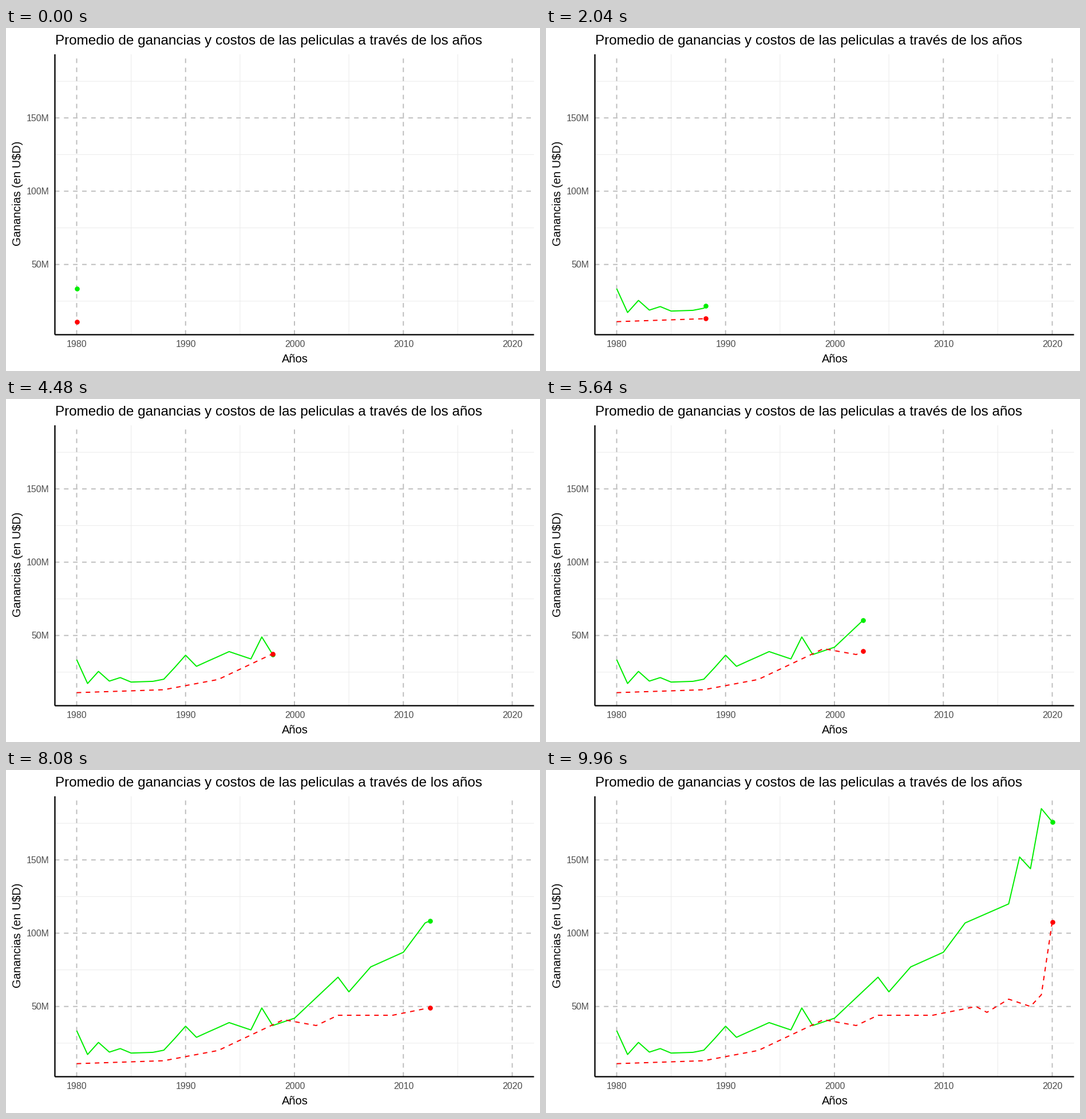
Animation, 933 px wide and 600 px high, one loop 10 s. Source, as a matplotlib script:

```python
import numpy as np
import matplotlib.pyplot as plt
from matplotlib.animation import FuncAnimation

W, H, DPI = 933, 600, 100
FRAMES, INTERVAL = 250, 40
PX = 72 / DPI  # points per pixel

# Panel edges in pixels, measured from the top left
LEFT, RIGHT, TOP, BOTTOM = 85.45, 922.55, 46.0, 536.5
THIN, LINE, AXIS = 0.98 * PX, 1.98 * PX, 2.3 * PX
DASH = (0, (4, 4))
GREEN, RED, GREY = "#00EE00", "#FF0000", "#4D4D4D"
X0, X1, Y0, Y1 = 1978, 2022, 2.1, 193.4

# Turning points: years since 1980, millions of dollars
EARNINGS = [(0, 24), (6, 18), (8, 20), (10, 36.5), (11, 29), (14, 39),
            (16, 34), (17, 49), (18, 37), (20, 42), (24, 70), (25, 60),
            (27, 77), (30, 87), (32, 107), (36, 120), (37, 152),
            (38, 144), (39, 185), (40, 176)]
COSTS = [(0, 11), (8, 13), (13, 20), (19, 41), (22, 37), (24, 44),
         (29, 44), (33, 50), (34, 46), (36, 55), (38, 50), (39, 58),
         (40, 107.7)]

steps = np.arange(41)
years = 1980 + steps
# Earnings start with an alternating swing that dies out
swing = 9.5 * (-1.0) ** steps * np.exp(-steps / 2)
earnings = np.interp(steps, *zip(*EARNINGS)) + swing
costs = np.interp(steps, *zip(*COSTS))

plt.rcParams["font.family"] = "Liberation Sans"
fig = plt.figure(figsize=(W / DPI, H / DPI), dpi=DPI, facecolor="white")
ax = fig.add_axes([LEFT / W, 1 - BOTTOM / H,
                   (RIGHT - LEFT) / W, (BOTTOM - TOP) / H])
ax.set(xlim=(X0, X1), ylim=(Y0, Y1))
ax.axis("off")


def label(x, y, text, size, color="black", ha="center", **kw):
    fig.text(x / W, 1 - y / H, text, fontsize=size * PX, color=color,
             ha=ha, va="baseline", **kw)


def rule(xs, ys, color, width, **kw):
    ax.plot(xs, ys, color=color, lw=width, snap=False,
            solid_capstyle="butt", **kw)


def grid(x_values, y_values, color, width, style):
    for y in y_values:
        rule([X0, X1], [y, y], color, width, ls=style, zorder=1)
    for x in x_values:
        rule([x, x], [Y0, Y1], color, width, ls=style, zorder=1)


grid(range(1985, 2020, 10), range(25, 176, 50), "#EBEBEB", THIN, "-")
grid(range(1980, 2021, 10), range(50, 151, 50), "#BEBEBE", LINE, DASH)
rule([X0, X1], [Y0, Y0], "black", AXIS, clip_on=False, zorder=5)
rule([X0, X0], [Y0, Y1], "black", AXIS, clip_on=False, zorder=5)

label(LEFT + 0.8, 29, "Promedio de ganancias y costos de las peliculas "
      "a través de los años", 24.22, ha="left")
label(504.5, 585, "Años", 20.2)
label(26.5, 289.5, "Ganancias (en U$D)", 20.2, rotation=90,
      rotation_mode="anchor")
for year in range(1980, 2021, 10):
    x = LEFT + (year - X0) / (X1 - X0) * (RIGHT - LEFT)
    label(x + 0.5, 557.5, str(year), 16, GREY)
for value in (50, 100, 150):
    y = BOTTOM - (value - Y0) / (Y1 - Y0) * (BOTTOM - TOP)
    label(75.4, y + 5.6, f"{value}M", 15.9, GREY, ha="right")


def series(color, style, z):
    line, = ax.plot([], [], color=color, lw=LINE, ls=style, zorder=z,
                    solid_capstyle="butt", solid_joinstyle="round",
                    dash_joinstyle="round")
    dot, = ax.plot([], [], "o", color=color, ms=8.6 * PX, mew=0,
                   zorder=z + 0.5)
    return line, dot


tracks = [(earnings, *series(GREEN, "-", 2)),
          (costs, *series(RED, DASH, 3))]


def update(i):
    now = 1980 + 40 * i / (FRAMES - 1)
    past = years[years < now]
    artists = []
    for values, line, dot in tracks:
        tip = np.interp(now, years, values)
        line.set_data(np.append(past, now),
                      np.append(values[:len(past)], tip))
        dot.set_data([now], [tip])
        artists += [line, dot]
    return artists


anim = FuncAnimation(fig, update, frames=FRAMES, interval=INTERVAL,
                     repeat=True, repeat_delay=0)
plt.show()
```
